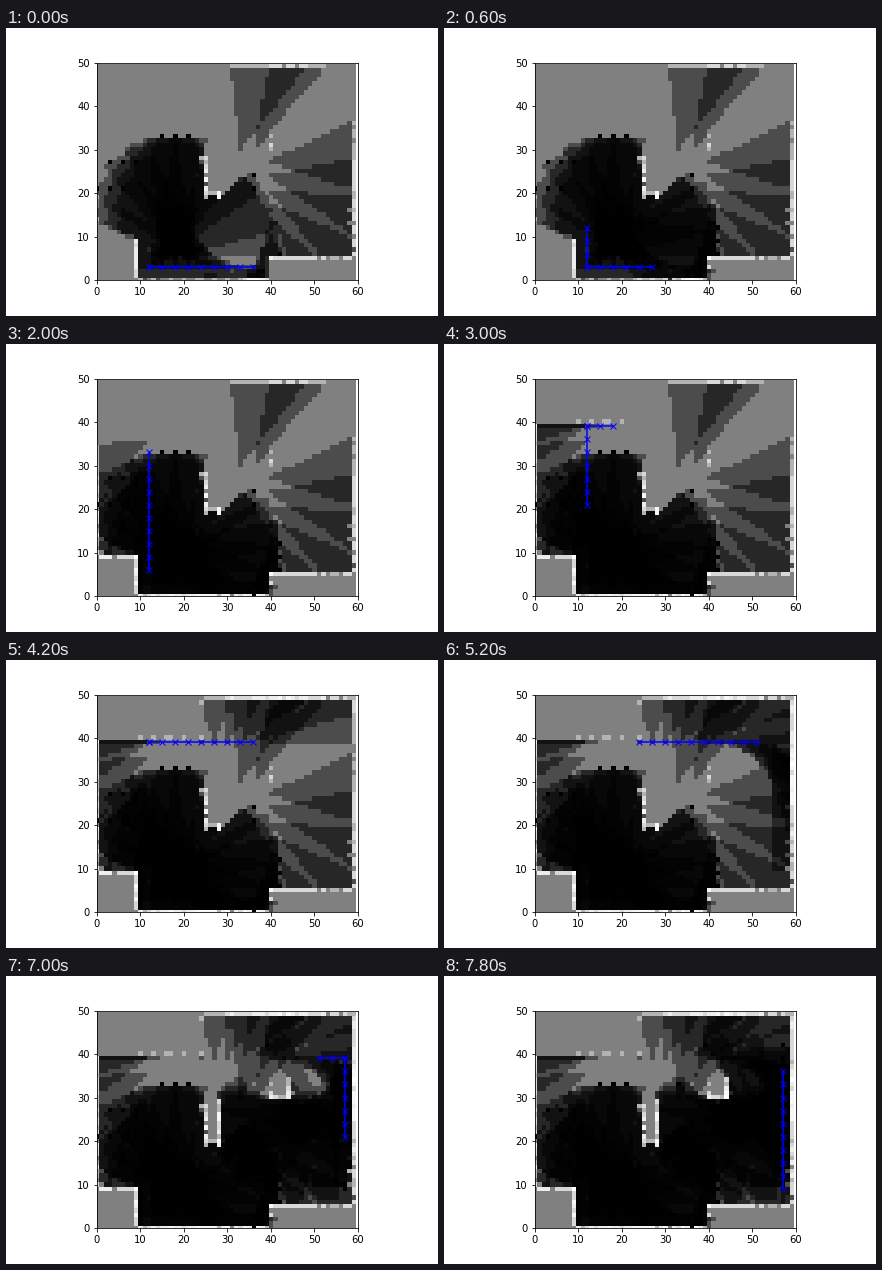
A matplotlib script that plays this animation: 432 px wide and 288 px high, repeating every 8 s.

```python
import math

import matplotlib.pyplot as plt
import numpy as np
from matplotlib.animation import FuncAnimation

ROWS, COLS = 50, 60
FIRST, FRAMES, STEP_MS = 25, 40, 200   # first simulated step on show
TRAIL = 10
RMAX, ALPHA, BETA = 30, 1.0, 0.05
BEAMS = np.arange(-0.4, 0.4, 0.05)
TURN = 0.3
MOVES = [(3, 0), (0, 3), (-3, 0), (0, -3)]

world = np.zeros((ROWS, COLS), bool)
for r0, r1, c0, c1 in [(0, 10, 0, 10), (30, 35, 40, 45), (3, 6, 40, 60),
                       (20, 30, 25, 29), (40, 50, 5, 25)]:
    world[r0:r1, c0:c1] = True
world[[0, -1], :] = True
world[:, [0, -1]] = True

grid_r, grid_c = np.mgrid[0:ROWS, 0:COLS]


def blocked(row, col):
    inside = 0 < row < ROWS - 1 and 0 < col < COLS - 1
    return not inside or world[row, col]


def drive(steps):
    """Go straight until blocked, then pick the next direction; spin steadily."""
    row, col, theta, d = 30, 30, 0.0, 1
    poses = [(row, col, theta)]
    for _ in range(steps):
        dr, dc = MOVES[d]
        if blocked(row + dr, col + dc):
            d = (d + 1) % 4
        else:
            row, col = row + dr, col + dc
        theta = (theta + TURN) % (2 * math.pi)
        poses.append((row, col, theta))
    return poses


def cast(row, col, angle):
    for r in range(1, RMAX + 1):
        if blocked(round(row + r * math.cos(angle)),
                   round(col + r * math.sin(angle))):
            return r
    return RMAX


def scan(row, col, theta):
    """Probability of each cell being occupied, from one sweep of beams."""
    hits = np.array([cast(row, col, theta + b) for b in BEAMS], float)
    dr, dc = grid_r - row, grid_c - col
    dist = np.sqrt(dr ** 2 + dc ** 2)
    phi = (np.arctan2(dc, dr) - theta + math.pi) % (2 * math.pi) - math.pi
    gap = np.abs(phi[..., None] - BEAMS)
    reach = hits[gap.argmin(axis=-1)]
    unseen = ((dist > np.minimum(RMAX, reach + ALPHA / 2))
              | (gap.min(axis=-1) > BETA / 2))
    wall = (reach < RMAX) & (np.abs(dist - reach) < ALPHA / 2)
    # cells exactly at full range match no case and count as surely free
    return np.select([unseen, wall, dist < reach], [0.5, 0.7, 0.3], 0.0)


def beliefs(poses):
    odds = np.zeros((ROWS, COLS))
    maps = [np.full((ROWS, COLS), 0.5)]
    with np.errstate(divide="ignore"):
        for pose in poses[1:]:
            p = scan(*pose)
            odds = odds + np.log(p / (1 - p))
            maps.append(1 / (1 + np.exp(-odds)))
    return maps


poses = drive(FIRST + FRAMES - 1)
maps = beliefs(poses)

plt.rcParams["font.family"] = "DejaVu Sans"
fig = plt.figure(figsize=(6, 4), dpi=72, facecolor="white")
fig.subplots_adjust(left=0.125, right=0.9, bottom=0.125, top=0.88)
ax = fig.add_subplot(111)
ax.set_xlim(0, COLS)
ax.set_ylim(0, ROWS)
ax.set_xticks(range(0, COLS + 1, 10))
ax.set_yticks(range(0, ROWS + 1, 10))
image = ax.imshow(maps[FIRST], cmap="gray", origin="lower", vmin=0, vmax=1,
                  interpolation="nearest")
trail, = ax.plot([], [], "bx-")


def update(k):
    i = FIRST + k
    rows, cols, _ = zip(*poses[i - TRAIL:i])
    image.set_data(maps[i])
    trail.set_data(cols, rows)
    return image, trail


anim = FuncAnimation(fig, update, frames=FRAMES, interval=STEP_MS, repeat=True,
                     repeat_delay=0)
plt.show()
```
